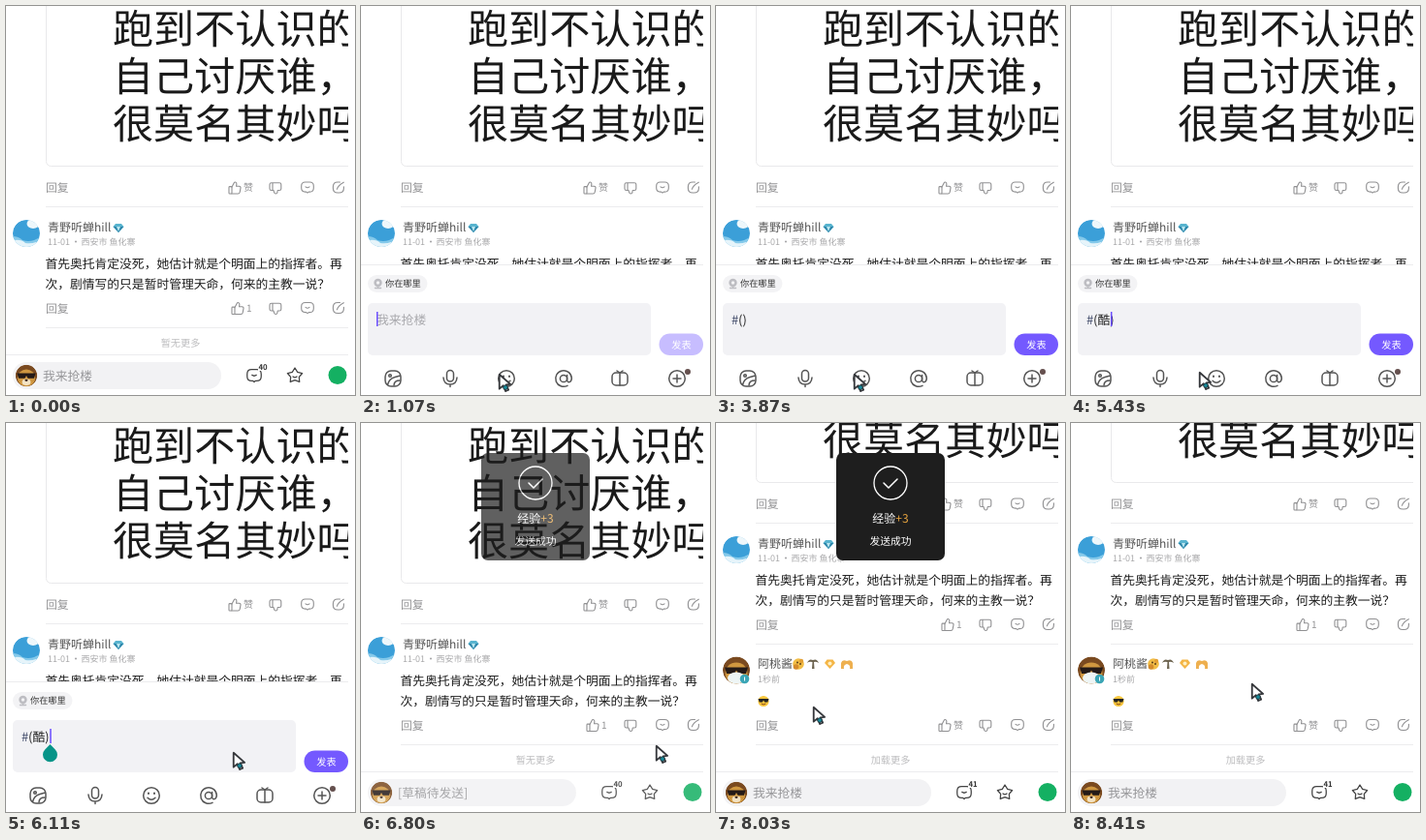
An HTML page that plays this animation: 360x402 px, repeating every 9410 ms.

```html
<!DOCTYPE html>
<html lang="zh">
<head>
<meta charset="utf-8">
<title>评论回复</title>
<style>
html, body { margin: 0; width: 100%; height: 100%; overflow: hidden; background: #fff; }
svg { display: block; width: 100%; height: 100%; }
text { font-family: "Noto Sans CJK SC", "Noto Sans CJK", "Noto Sans", sans-serif; text-rendering: geometricPrecision; white-space: pre; }
.line { fill: none; stroke-linecap: round; stroke-linejoin: round; }
.soft { filter: blur(.5px); }
</style>
</head>
<body>
<svg id="stage" viewBox="0 0 360 402" xmlns="http://www.w3.org/2000/svg">
  <defs>
    <clipPath id="disc"><circle r="14"/></clipPath>
    <g id="thumb" class="line">
      <rect x="-6" y="-1.4" width="3" height="7.4" rx=".8"/>
      <path d="M-3-.9 -.6-5.4q.3-.8 1.1-.6 1.6.4 1.4 2.2L1.5-1.7H4.500q1.8.2 1.5 1.9L5.200 4.400Q4.800 6 3.300 6H-3"/>
    </g>
    <g id="down" class="line">
      <path d="M-4.200-5.300H4Q5.800-5.300 5.800-3.500V.7Q5.800 2.500 4 2.500H2.200L1.900 4.600Q1.600 6 .3 6T-1.400 4.600L-2 2.500H-4.200Q-6 2.500-6 .7V-3.500Q-6-5.300-4.200-5.300ZM-3-5.300V2.500"/>
    </g>
    <g id="bubble" class="line">
      <path d="M-2.300-5.500H2.300Q6.300-5.500 6.300-1.500V.6Q6.300 4.600 2.300 4.600H1.300L0 5.700 -1.300 4.600H-2.300Q-6.300 4.600-6.300.6V-1.500Q-6.300-5.500-2.300-5.500Z"/>
      <path d="M-2-.6Q0 1 2-.6"/>
    </g>
    <g id="share" class="line">
      <path d="M1.500-5.500H-.8Q-5.600-5.500-5.600-.7V.7Q-5.600 5.500-.8 5.500H.6Q5.400 5.500 5.400.7V-.8"/>
      <path d="M-1.600 1.800Q-.6-2 5.300-5.300"/>
    </g>
    <g id="bear" clip-path="url(#disc)">
      <circle r="14" fill="#7a4a20"/>
      <ellipse cy="3" rx="11.500" ry="11" fill="#cf9740"/>
      <ellipse cy="8.500" rx="5.500" ry="4" fill="#f3e3c4"/>
      <path d="M-12-3H12L10 3.500H2L0 0 -2 3.500H-10Z" fill="#241a17"/>
      <ellipse cy="6" rx="2" ry="1.400" fill="#3a2418"/>
    </g>
  </defs>
  <g id="page"></g>
  <g id="bar"></g>
  <g id="panel"></g>
  <rect x="353" width="7" height="402" fill="#fff"/>
  <g id="toast"></g>
  <g id="cursor">
    <g transform="scale(.92)">
      <path d="M.8.800V17L5.200 13.400 7.800 19.600 11 18.200 8.400 12.300 13.200 11.800Z" fill="#fff" stroke="#36383c" stroke-width="2" stroke-linejoin="round"/>
      <circle cx="7.600" cy="15.400" r="2.500" fill="#168a9a" stroke="#26343a"/>
    </g>
  </g>
</svg>
<script>
const LOOP = 9410;
const $ = id => document.getElementById(id);

// Text whose ideographs are centred on cy
const txt = (x, cy, size, str, fill, more = '') =>
  `<text x="${x}" y="${cy + size * 0.38}" font-size="${size}" fill="${fill}" ${more}>${str}</text>`;
const icon = (id, x, y, color = '#909092', width = 1.1, turn = '') =>
  `<use href="#${id}" transform="translate(${x} ${y}) ${turn}" stroke="${color}" stroke-width="${width}"/>`;
const rule = (y, x = 41) => `<path d="M${x} ${y}H353" stroke="#ececee"/>`;
const box = (x, y, w, h, r, fill, more = '') =>
  `<rect x="${x}" y="${y}" width="${w}" height="${h}" rx="${r}" fill="${fill}" ${more}/>`;
const dot = (x, y, r, fill) => `<circle cx="${x}" cy="${y}" r="${r}" fill="${fill}"/>`;
const at = (x, y, art, scale = 1) => `<g transform="translate(${x} ${y}) scale(${scale})">${art}</g>`;

const actions = (y, count) => txt(41, y, 11.8, '回复', '#929294')
  + icon('thumb', count ? 239 : 236, y)
  + txt(count ? 248 : 245, y - 0.5, 10, count || '赞', '#929294')
  + icon('down', 278, y) + icon('bubble', 311, y - 0.5) + icon('share', 343, y - 0.5);

const skyAvatar = `<g clip-path="url(#disc)"><circle r="14" fill="#3b9fd8"/>
  <ellipse cx="7" cy="-10" rx="6.500" ry="5" fill="#eef7fb"/>
  <path d="M-14 3Q-8 3-4 7 2 9 8 7L14 4V15H-14Z" fill="#84c9ea"/>
  <path d="M-12 7Q-5 6-1 10 5 11 10 9V15H-12Z" fill="#e6f4fa"/></g>`;
const gem = `<path d="M-3-4H3L5.500-1 0 5-5.500-1Z" fill="#58b4cf"/>
  <path d="M-5.500-1H5.500L0 5Z" fill="#2e87ab"/><path d="M-2-1H2L0 4Z" fill="#b9e6f0"/>`;
const coolFace = dot(0, 0, 5.6, '#f8c63c')
  + '<path d="M-5.500-2.500H5.500L4.300 1H1.200L0-1-1.200 1H-4.300Z" fill="#222"/>'
  + '<path d="M-2 2.800Q0 4.400 2 2.800" class="line" stroke="#8a4a16"/>';
const shyFace = dot(0, 0, 5.8, '#f2bd45') + dot(-2.5, 3, 2.8, '#d48b2c')
  + dot(3, -3, 2.2, '#e3a034') + dot(-1, -1.5, 0.9, '#4b3216') + dot(2, 0, 0.9, '#4b3216');
const palm = `<path d="M-6-1Q-4-6 0-4 4-6 6-1 3-3 1-2L1.500 5H-1L-.5-2Q-4-3-6-1Z" fill="#6d6450"/>`;
const badge = `<path d="M-5.500-1-3-4.500H3L5.500-1 0 5Z" fill="#f4b545"/>` + dot(0, -0.5, 2, '#fff0c4');
const hands = `<path d="M-6 5V-1Q-5-5 0-3 5-5 6-1V5H3Q4 1 0 0-4 1-3 5Z" fill="#eeb04f"/>`;

$('page').innerHTML =
  box(41.5, -30, 340, 195.5, 5, '#fff', 'stroke="#e9e9eb"')
  + '<g class="soft">' + ['跑到不认识的', '自己讨厌谁，', '很莫名其妙吗'].map((s, i) =>
      txt(110, 22.8 + i * 49.1, 42.1, s, '#1a1a1a')).join('') + '</g>'
  + actions(188) + rule(207.5)
  + at(21, 235, skyAvatar) + txt(43, 228, 12, '青野听蝉hill', '#555')
  + at(116, 229, gem)
  + txt(43, 243.5, 9, '11-01', '#a8a8aa') + dot(72, 243.5, 1.1, '#a8a8aa')
  + txt(77.5, 243.5, 9, '西安市 鱼化寨', '#a8a8aa')
  + txt(40.5, 266.5, 12.78, '首先奥托肯定没死，她估计就是个明面上的指挥者。再', '#1c1c1c')
  + txt(40.5, 287, 12.78, '次，剧情写的只是暂时管理天命，何来的主教一说？', '#1c1c1c')
  + actions(312.5, '1') + rule(332.5)
  + `<g id="none">${txt(180, 348, 10.2, '暂无更多', '#bcbcbe', 'text-anchor="middle"')}</g>`
  + '<g id="reply">'
  + at(21, 359.5, '<use href="#bear"/>' + '<ellipse cy="8" rx="9" ry="6" fill="#eef5f5" clip-path="url(#disc)"/>' + dot(8.5, 9, 4.8, '#3aa5b5') + '<path d="M8.500 7V11" stroke="#fff"/>')
  + txt(43, 352, 12, '阿桃酱', '#555')
  + at(85, 353, shyFace) + at(100, 353, palm) + at(117.5, 353, badge) + at(135, 353, hands)
  + txt(43, 369, 9, '1秒前', '#a8a8aa') + at(49, 391.5, coolFace)
  + actions(416.5) + rule(436.5)
  + txt(180, 452, 10.2, '加载更多', '#bcbcbe', 'text-anchor="middle"') + '</g>';

const star = Array.from({ length: 10 }, (_, i) => {
  const a = (i / 5 - 0.5) * Math.PI, r = i % 2 ? 4.6 : 8;
  return `${(r * Math.cos(a)).toFixed(2)},${(r * Math.sin(a)).toFixed(2)}`;
}).join(' ');

$('bar').innerHTML = box(0, 360, 360, 42, 0, '#fff') + rule(360.5, 0)
  + '<g id="barItems">' + box(7, 368, 215, 28, 14, '#f2f2f4')
  + at(21, 382, '<use href="#bear"/>', 0.8)
  + txt(38, 382, 12.75, '', '#97979a', 'id="hint"')
  + icon('bubble', 256, 382, '#444', 1.1, 'scale(1.15)')
  + box(260, 368, 10, 9, 0, '#fff')
  + txt(260.5, 373, 7.8, '', '#333', 'id="count" font-weight="700"')
  + at(298, 382, `<polygon points="${star}" class="line" stroke="#444" stroke-width="1.300"/><path d="M-2 1Q0 2.800 2 1" class="line" stroke="#444" stroke-width="1.200"/>`)
  + dot(342, 381.5, 9.5, '#14b062') + '</g>';

const tools = [
  [33, '<rect x="-8" y="-8" width="16" height="16" rx="6"/><circle cx="-3" cy="-3" r="1.300"/><path d="M-5.500 6.500Q-4 0 2-1.500L7.500-3M1 7Q1 2 7 2"/>'],
  [92, '<rect x="-3.500" y="-8.500" width="7" height="11.500" rx="3.500"/><path d="M-7-1Q-6.500 6 0 6T7-1M0 6V8.500"/>'],
  [150, '<circle r="8.300"/><path d="M-3-2.500V-2M3-2.500V-2" stroke-width="2"/><path d="M-4 2.300Q0 6.300 4 2.300"/>'],
  [209, '<circle r="3.600"/><path d="M3.600-3.500V1.500Q3.800 4 6 3.600 8.300 2.800 8.300-.5A8.300 8.300 0 1 0 4 7.300"/>'],
  [267, '<rect x="-8" y="-6" width="16" height="13" rx="4"/><path d="M0-6V7M-3-8 0-6 3-8"/>'],
  [326, '<circle r="8.300"/><path d="M-4 0H4M0-4V4"/>']
];

$('panel').innerHTML = box(0, 267, 360, 135, 0, '#fff') + rule(267.5, 0)
  + box(7, 278, 61.5, 18, 9, '#f3f3f5')
  + '<path d="M17.500 286V291M14.500 291.500H20.500" class="line" stroke="#bdbdc2" stroke-width="1.500"/>'
  + dot(17.5, 286, 4.2, '#bdbdc2') + dot(17.5, 286, 1.7, '#f3f3f5')
  + txt(25, 287, 9.2, '你在哪里', '#333', 'font-weight="500"')
  + box(7, 307, 292, 54, 5, '#f2f2f5')
  + txt(16, 323.7, 12.8, '', '#222', 'id="draft"')
  + box(0, 316, 1.5, 15, 0, '#6a4dff', 'id="caret"')
  + '<path id="handle" d="M45.500 332 50.800 337.500A7.500 7.500 0 1 1 40.200 337.500Z" fill="#079488"/>'
  + box(307.5, 338.5, 45.5, 22.5, 11.2, '#7459ff', 'id="send"')
  + txt(330.5, 349.7, 10.2, '发表', '#fff', 'text-anchor="middle"')
  + tools.map(([x, art]) => at(x, 385, `<g class="line" stroke="#555" stroke-width="1.500">${art}</g>`)).join('')
  + dot(337, 378, 3, '#65504e');

$('toast').innerHTML = box(124, 31, 112, 111, 7, '#1e1e1e')
  + '<circle cx="180" cy="62" r="17" class="line" stroke="#fff" stroke-width="1.300"/><path d="M173 62 178 67 187 58" class="line" stroke="#fff" stroke-width="1.500"/>'
  + txt(180, 98.5, 12, '经验<tspan fill="#e5a23f">+3</tspan>', '#fff', 'text-anchor="middle"')
  + txt(180, 122, 10.8, '发送成功', '#fff', 'text-anchor="middle"');

// time, draft text, characters before the caret (-1 hides it)
const typing = [
  [1070, '', 0], [1530, '#', 1], [2080, '#', -1], [2460, '#(', 2], [2710, '#()', 3],
  [3240, '#()', -1], [3410, '#()', 2], [3870, '#()', -1], [4420, '#(酷)', 3],
  [4970, '#(酷)', -1], [5430, '#(酷)', 3], [5580, '#(酷)', 4]
];
// start, end, steps, from x, y, to x, y
const moves = [
  [210, 750, 8, 232, 391, 142, 380],
  [5430, 5430, 1, 142, 380, 132, 378],
  [5580, 5660, 2, 136, 378, 147, 376],
  [5810, 6110, 5, 165, 366, 234, 340],
  [6190, 6420, 4, 254, 338, 304, 333],
  [6870, 7040, 3, 282, 312, 232, 271],
  [7650, 7800, 3, 190, 276, 98, 295],
  [8030, 8030, 1, 98, 295, 100, 293],
  [8110, 8410, 5, 118, 288, 186, 269]
];
const scrolls = [[0, 0], [6870, 35], [6950, 80], [7040, 104]];
const fades = [[0, 0], [6570, 0.18], [6650, 0.38], [6730, 0.56], [6800, 0.7], [6870, 0.85], [6950, 1],
  [8110, 0.8], [8190, 0.6], [8260, 0.4], [8340, 0.2], [8410, 0]];

const last = (list, t) => list.filter(k => k[0] <= t).pop();
const show = (id, on) => $(id).setAttribute('display', on ? 'inline' : 'none');

function placeCursor(t) {
  const m = last(moves, t);
  show('cursor', m);
  if (!m) return;
  const [start, end, n, x0, y0, x1, y1] = m;
  const p = n < 2 ? 1 : Math.min(n - 1, Math.floor((t - start) / (end - start) * (n - 1) + 1e-6)) / (n - 1);
  $('cursor').setAttribute('transform', `translate(${x0 + (x1 - x0) * p} ${y0 + (y1 - y0) * p})`);
}

function editDraft(t) {
  const [, str, pos] = last(typing, t);
  const draft = $('draft');
  draft.innerHTML = str ? `<tspan fill="#3d4766">#</tspan>${str.slice(1)}` : '我来抢楼';
  draft.setAttribute('fill', str ? '#222' : '#a9a9ad');
  $('send').setAttribute('fill', str ? '#7459ff' : '#c7bdff');
  show('caret', pos >= 0);
  if (pos >= 0) $('caret').setAttribute('x', pos ? draft.getEndPositionOfChar(pos - 1).x + 0.7 : 16);
  show('handle', t >= 5660);
}

function draw(t) {
  const editing = t >= 1070 && t < 6490;
  const sent = t >= 6870;
  const waiting = t >= 6490 && !sent;
  $('page').setAttribute('transform', `translate(0 ${-last(scrolls, t)[1]})`);
  show('none', !sent);
  show('reply', sent);
  $('hint').textContent = waiting ? '[草稿待发送]' : '我来抢楼';
  $('count').textContent = sent ? '41' : '40';
  $('barItems').setAttribute('opacity', waiting ? 0.85 : 1);
  show('panel', editing);
  if (editing) editDraft(t);
  const alpha = last(fades, t)[1];
  show('toast', alpha);
  $('toast').setAttribute('opacity', alpha);
  placeCursor(t);
}

const origin = performance.now();
function tick() {
  draw((performance.now() - origin) % LOOP);
  requestAnimationFrame(tick);
}
tick();
</script>
</body>
</html>
```
